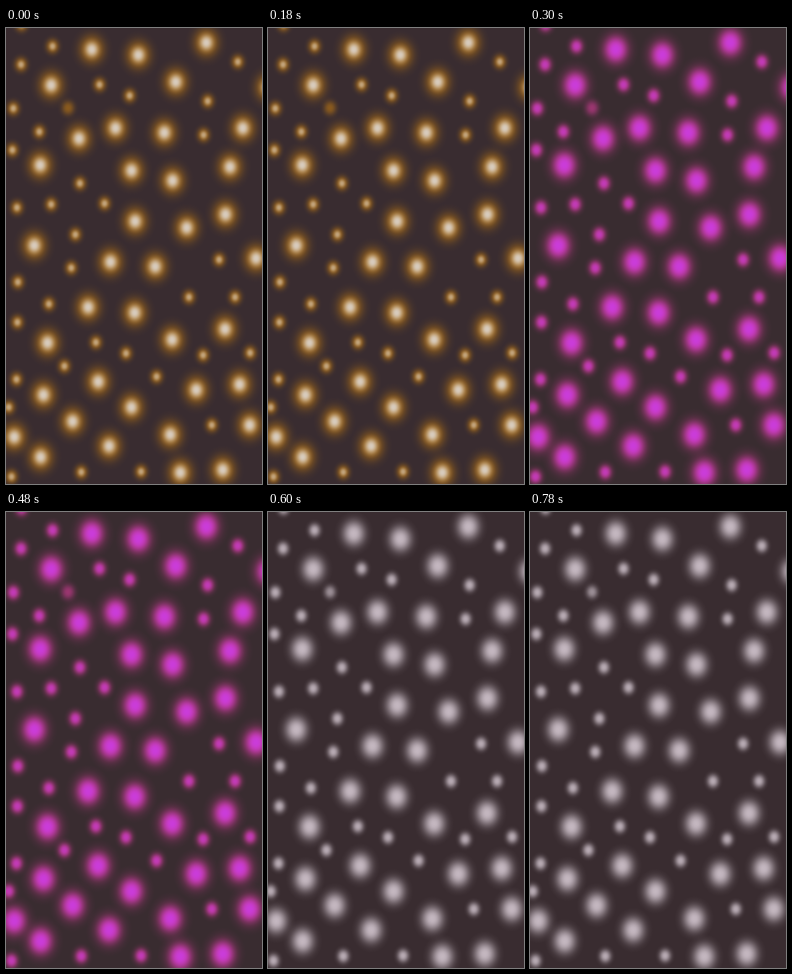
An HTML page with a canvas that plays this animation: 561 px wide and 998 px high, repeating every 900 ms.

```html
<!DOCTYPE html>
<html>
<head>
<meta charset="utf-8">
<style>
html, body { margin: 0; height: 100%; overflow: hidden; background: #392c30; }
canvas { display: block; }
</style>
</head>
<body>
<canvas id="stage" width="561" height="998"></canvas>
<script>
const ctx = document.getElementById('stage').getContext('2d');

// Each look lasts 300 ms: a wide glow and, on top, an optional core
const looks = [
  { glow: { rgb: '172,110,22', half: 25 }, core: { rgb: '216,204,190', half: 13 } },
  { glow: { rgb: '196,58,140', half: 27 }, core: { rgb: '202,60,218', half: 17 } },
  { glow: { rgb: '197,184,193', half: 23 } }
];

// Kinds of dot: scale, layer strengths and centres
const kinds = [
  { size: 1, glow: 1, core: 1, at: [
    [439,32], [574,130], [240,219], [160,242], [347,229], [519,219], [75,300], [275,312],
    [365,334], [491,304], [481,408], [283,423], [396,437], [62,476], [229,512], [327,522],
    [548,504], [480,659], [202,774], [82,803], [417,792], [512,780], [275,830], [146,861],
    [360,890], [534,869], [18,895], [226,915], [76,939], [382,973], [475,967],
    ...twice([188,47], [290,59], [99,125], [372,118])
  ] },
  { size: .52, glow: .9, core: .6, at: [
    [508,74], [442,160], [16,176], [73,227], [433,234], [14,267], [162,340], [24,393],
    [99,386], [216,384], [152,452], [143,525], [467,507], [401,589], [502,589], [432,716],
    [535,711], [23,769], [330,763], [6,830], [451,869], [165,972], [296,971], [12,982],
    ...twice([34,-8], [102,40], [33,80], [205,124], [271,148])
  ] },
  { size: .52, glow: .7, core: 0, at: [[136,175]] },
  { size: .52, glow: .9, core: .6, at: [[128,740]] }
];

// The upper left group of dots appears again further down
function twice(...group) {
  return [...group, ...group.map(([x, y]) => [x - 8, y + 564])];
}

// Bell-shaped falloff that reaches half strength at r = 1
const bell = r => Math.exp(-Math.LN2 * r ** 2.4);

function drawLayer(points, { rgb, half }, size, strength) {
  const reach = 2.2, steps = 24, radius = half * size * reach;
  const fill = ctx.createRadialGradient(0, 0, 0, 0, 0, radius);
  for (let i = 0; i <= steps; i++) {
    const alpha = strength * (bell(i / steps * reach) - bell(reach));
    fill.addColorStop(i / steps, `rgba(${rgb},${alpha.toFixed(4)})`);
  }
  ctx.fillStyle = fill;
  for (const [x, y] of points) {
    ctx.setTransform(.88, 0, 0, 1, x, y);
    ctx.fillRect(-radius, -radius, 2 * radius, 2 * radius);
  }
  ctx.resetTransform();
}

function drawLook(look) {
  ctx.fillStyle = '#392c30';
  ctx.fillRect(0, 0, 561, 998);
  for (const layer of ['glow', 'core']) {
    if (!look[layer]) continue;
    for (const kind of kinds) drawLayer(kind.at, look[layer], kind.size, kind[layer]);
  }
}

const start = performance.now();
function tick() {
  drawLook(looks[Math.floor((performance.now() - start) / 300) % looks.length]);
  requestAnimationFrame(tick);
}
tick();
</script>
</body>
</html>
```
